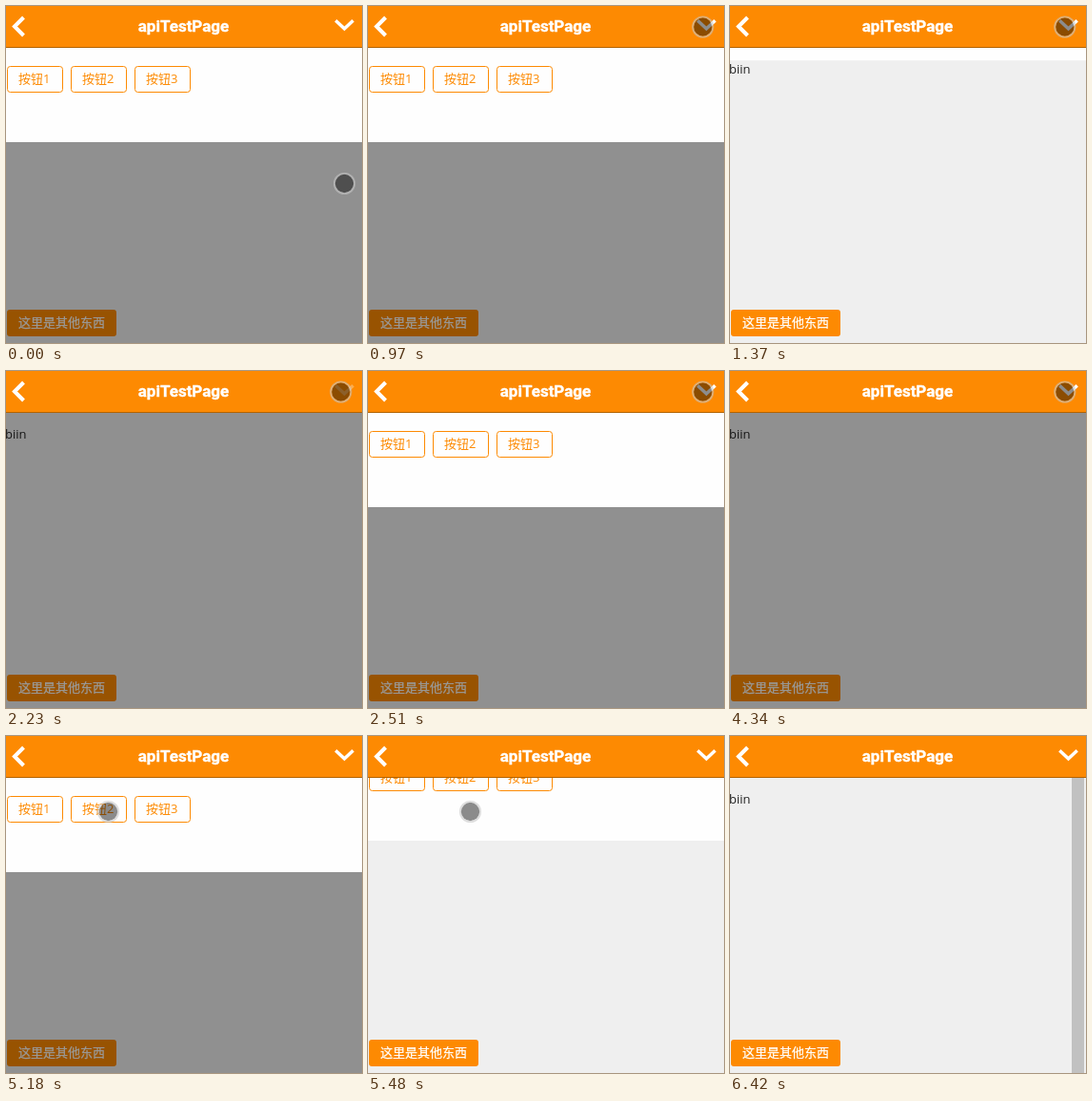
Write an HTML page that moves like this. It is 374 px wide and 354 px high and loops after 6890 ms.

```html
<!DOCTYPE html>
<html lang="zh">
<head>
<meta charset="utf-8">
<title>apiTestPage</title>
<style>
  html, body { margin: 0; width: 100%; height: 100%; overflow: hidden; background: #efefef; }
  svg { display: block; width: 374px; height: 354px; }
  text { font: 13px "Open Sans", "Noto Sans CJK SC", "Noto Sans CJK", sans-serif; }
  .title { font: 700 17px Roboto, sans-serif; stroke: #fff; stroke-width: .4; }
  .solid { fill: #fff; stroke: #fff; stroke-width: .25; }
  .outline rect { fill: none; stroke: #fd8a02; }
  .outline text { fill: #fd8a02; }
</style>
</head>
<body>
<svg viewBox="0 0 374 354">
  <defs>
    <clipPath id="below"><rect y="44" width="374" height="310"/></clipPath>
  </defs>
  <rect width="374" height="354" fill="#efefef"/>
  <text x="-1" y="71" fill="#222">biin</text>
  <rect x="1" y="319" width="115" height="28" rx="3" fill="#fd8a02"/>
  <text class="solid" x="13" y="337">这里是其他东西</text>
  <rect id="shade" y="44" width="374" height="310" opacity=".4"/>
  <g clip-path="url(#below)">
    <g id="panel">
      <rect y="44" width="374" height="99" fill="#fefefe"/>
    </g>
  </g>
  <rect id="bar" x="359" y="44" width="13" height="310" fill="#c1c1c1"/>
  <rect width="374" height="43" fill="#fd8a02"/>
  <rect y="43" width="374" height="1" fill="#b26200"/>
  <path d="M18.5 12L9 21.5L18.5 31" fill="none" stroke="#fff" stroke-width="4"/>
  <text class="title" x="186.5" y="27" text-anchor="middle" fill="#fff">apiTestPage</text>
  <path id="toggle" d="M346.3 15.2L355.5 23.8L364.7 15.2" fill="none" stroke="#fff" stroke-width="3.4"/>
  <g id="pointer">
    <circle r="9.7" fill-opacity=".45"/>
    <circle r="10.6" fill="none" stroke="#c8c8c8" stroke-opacity=".6" stroke-width="1.9"/>
  </g>
</svg>
<script>
const LOOP = 6890, BEAT = 120, HEIGHT = 99;
const TAP = 5330, SCROLL = 5720, LEAVE = 6420;
const slides = [1250, 2230, 3350, 4340, 5480]; // closing and opening in turn
const presses = [1250, 2230, 3350, 4190];
const home = { x: 355.5, y: 186.5 };
const strokes = [
  { from: 0, to: 970, x: 351.8, y: 22, bend: 6 },
  { from: 4370, to: 4490, x: 231.5, y: 53, bend: 0 },
  { from: 4490, to: 5180, x: 107.5, y: 79.5, bend: 0 },
  { from: 5480, to: 5720, x: 134, y: 130, bend: 0 },
  { from: 5750, to: 5870, x: 311, y: 76, bend: 0 },
  { from: 6030, to: 6270, x: 307.5, y: 346, bend: -18 }
];

const el = id => document.getElementById(id);
const [shade, panel, bar, toggle, pointer] =
  ["shade", "panel", "bar", "toggle", "pointer"].map(el);

const buttons = [1, 2, 3].map(n => {
  const g = document.createElementNS("http://www.w3.org/2000/svg", "g");
  const x = 1 + (n - 1) * 67;
  g.setAttribute("class", "outline");
  g.innerHTML = `<rect x="${x + 0.5}" y="63.5" width="58" height="27" rx="3"/>` +
    `<text x="${x + 12}" y="81">按钮${n}</text>`;
  panel.append(g);
  return g;
});

const easeOut = p => 1 - (1 - p) ** 1.8;
const during = (start, t) => t >= start && t < start + BEAT;
const show = (node, on) => node.setAttribute("visibility", on ? "visible" : "hidden");
const fade = (node, on) => node.setAttribute("opacity", on ? 0.3 : 1);
const move = (node, x, y) => node.setAttribute("transform", `translate(${x} ${y})`);

// Movement is seen in beats: the picture holds still between them
const beats = age => Math.floor(age / BEAT);

function openness(t) {
  const count = slides.filter(s => s <= t).length;
  if (!count) return 1;
  const step = beats(t - slides[count - 1]);
  return count % 2
    ? 1 - Math.min(1, (1 + 1.6 * step) / 3)
    : easeOut(Math.min(1, step / 1.3));
}

function pointerAt(t) {
  let { x, y } = home;
  for (const s of strokes) {
    if (t < s.from) break;
    const p = t >= s.to ? 1 : beats(t - s.from) * BEAT / (s.to - s.from);
    const k = easeOut(p);
    x += (s.x - x) * k + s.bend * Math.sin(Math.PI * p);
    y += (s.y - y) * k;
  }
  return [x, y];
}

function draw(t) {
  const closing = slides.filter(s => s <= t).length % 2;
  move(panel, 0, (openness(t) - 1) * HEIGHT);
  move(pointer, ...pointerAt(t));
  show(pointer, t < LEAVE);
  show(shade, !closing && t < TAP);
  show(bar, t >= SCROLL);
  fade(toggle, presses.some(s => during(s, t)));
  fade(buttons[1], during(TAP, t));
}

const start = performance.now();
function tick() {
  draw((performance.now() - start) % LOOP);
  requestAnimationFrame(tick);
}
tick();
</script>
</body>
</html>
```
